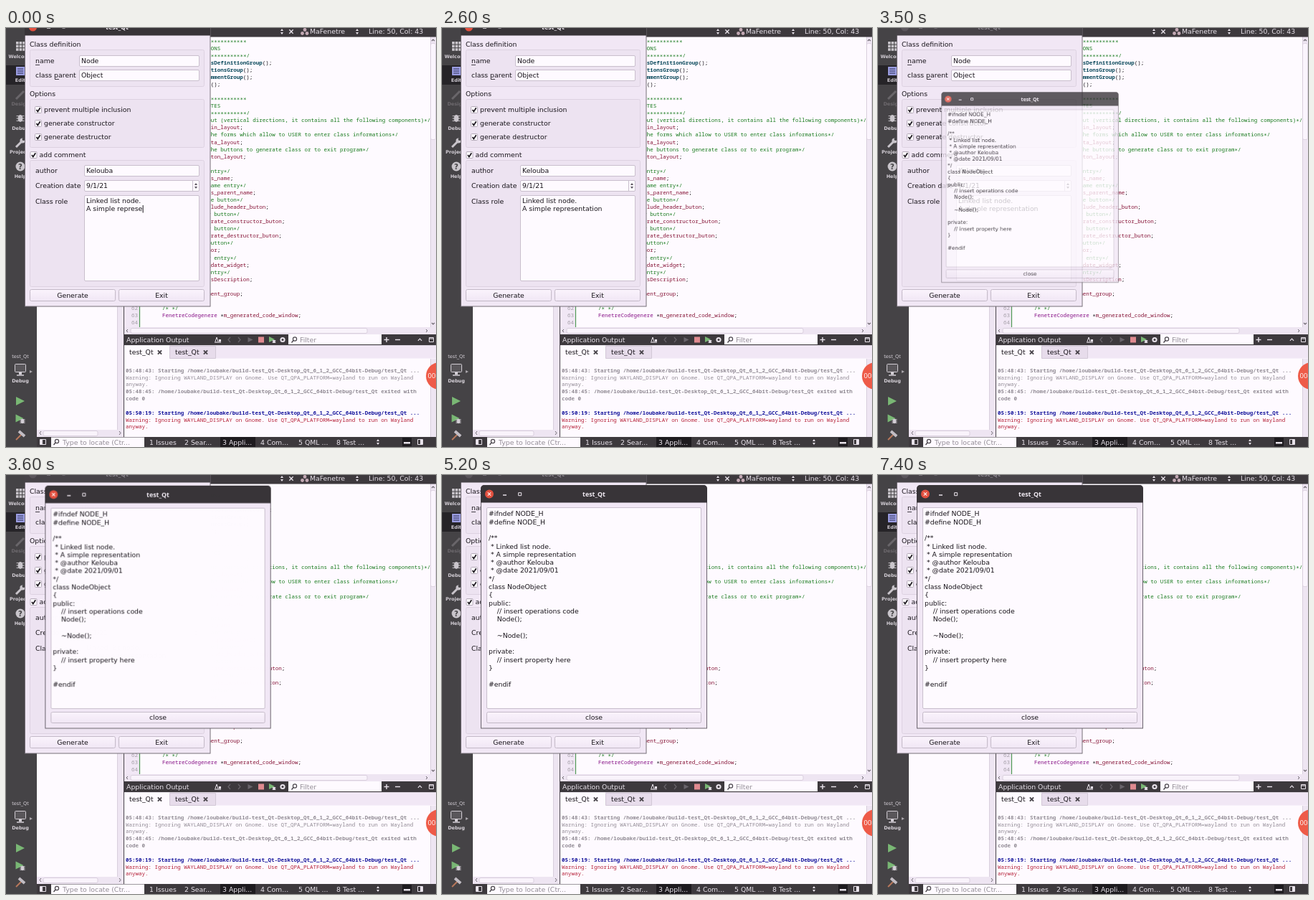
An HTML page with a canvas for the animation above (8000 ms loop, 600x584 px).

```html
<!DOCTYPE html>
<html>
<head>
<meta charset="utf-8">
<style>
html, body { margin: 0; width: 600px; height: 584px; overflow: hidden; }
canvas { display: block; }
</style>
</head>
<body>
<canvas id="stage" width="600" height="584"></canvas>
<script>
const UI = '9.33px "DejaVu Sans", sans-serif';
const SMALL = '6.5px "DejaVu Sans", sans-serif';
const SMALL_BOLD = 'bold 6.5px "DejaVu Sans", sans-serif';
const TITLE = 'bold 8.9px "Open Sans", sans-serif';
const MONO = '7.53px "Noto Sans Mono", "DejaVu Sans Mono", monospace';
const MONO_BOLD = 'bold ' + MONO;
const INK = '#19151b', PAPER = '#fefaff', PANEL = '#f1e7f5', EDGE = '#c9bfcd', BAR = '#3d393d', LIGHT = '#e8e2ea';
const GREEN = '#177a1c', FIELD = '#841234', PURPLE = '#850f85', GREY = '#928c95';

const screen = document.getElementById('stage').getContext('2d');
let g = screen;

function rect(x, y, w, h, fill, stroke, radius = 0) {
  g.beginPath();
  g.roundRect(x, y, w, h, radius);
  if (fill) { g.fillStyle = fill; g.fill(); }
  if (stroke) { g.strokeStyle = stroke; g.lineWidth = 1; g.stroke(); }
}
function circle(x, y, r, fill) {
  g.beginPath();
  g.arc(x, y, r, 0, 7);
  g.fillStyle = fill;
  g.fill();
}
function path(points, color, width) {
  g.beginPath();
  for (let i = 0; i < points.length; i += 2) g.lineTo(points[i], points[i + 1]);
  if (width) { g.strokeStyle = color; g.lineWidth = width; g.stroke(); }
  else { g.fillStyle = color; g.fill(); }
}
// y is the middle of the capitals
function text(str, x, y, color = INK, font = UI, align = 'left') {
  g.font = font;
  g.fillStyle = color;
  g.textAlign = align;
  g.fillText(str, x, y + parseFloat(font.match(/[\d.]+/)) * 0.36);
}
// code has its asterisks on the middle line
function code(str, x, y, color, font = MONO, align) {
  text(String(str).replaceAll('*', '\u2217'), x, y, color, font, align);
}
function cross(x, y, r, color, width) {
  path([x - r, y - r, x + r, y + r], color, width);
  path([x - r, y + r, x + r, y - r], color, width);
}
function chevron(x, y, s, color, up) {
  const d = up ? -s : s;
  path([x - s, y - d / 2, x, y + d / 2, x + s, y - d / 2], color, 1.2);
}
function updown(x, y, color = LIGHT) {
  path([x - 2, y - 1, x, y - 4, x + 2, y - 1], color);
  path([x - 2, y + 1, x, y + 4, x + 2, y + 1], color);
}
function play(x, y, r, color) {
  path([x - r, y - r, x + r, y, x - r, y + r], color);
}
function bug(x, y, s, color) {
  for (const d of [-s, 0, s]) path([x - 1.6 * s, y + d, x + 1.6 * s, y + d], color, 1);
  g.beginPath();
  g.ellipse(x, y, s, 1.5 * s, 0, 0, 7);
  g.fillStyle = color;
  g.fill();
}
function magnifier(x, y) {
  g.beginPath();
  g.arc(x, y, 2.6, 0, 7);
  g.strokeStyle = '#4b474d';
  g.lineWidth = 1.2;
  g.stroke();
  path([x - 2, y + 2, x - 4.5, y + 5], '#4b474d', 1.4);
}
function field(x, y, w, h, str) {
  rect(x + .5, y + .5, w - 1, h - 1, PAPER, EDGE, 1.5);
  if (str) text(str, x + 3, y + h / 2);
}
function button(x, y, w, h, label, active) {
  const shade = g.createLinearGradient(0, y, 0, y + h);
  shade.addColorStop(0, active ? '#e0dce8' : '#fbf4fd');
  shade.addColorStop(1, active ? '#cfcbda' : '#f0e6f4');
  rect(x + .5, y + .5, w - 1, h - 1, shade, active ? '#66809f' : '#c3b9c7', 2);
  text(label, x + w / 2, y + h / 2 - .3, INK, UI, 'center');
}
function check(x, y, label) {
  rect(x - 4.5, y - 4.5, 9, 9, PAPER, '#b5abb9', 1);
  path([x - 2.5, y, x - .7, y + 2.4, x + 2.7, y - 2.8], INK, 1.7);
  text(label, x + 8, y);
}
function layer(draw) {
  const canvas = document.createElement('canvas');
  canvas.width = 600;
  canvas.height = 584;
  g = canvas.getContext('2d');
  draw();
  g = screen;
  return canvas;
}

function drawSidebar() {
  rect(0, 0, 43, 584, '#454346');
  rect(0, 52, 43, 27, '#262428');
  for (let i = 0; i < 9; i++) rect(14 + i % 3 * 4.6, 19 + (i / 3 | 0) * 4.6, 3.6, 3.6, '#c9c5cb');
  rect(14, 54, 12, 12, '#9a9ce0');
  for (const y of [57, 60, 63]) path([16, y, 24, y], '#33345c', 1);
  path([14, 99, 25, 88], '#69666a', 3);
  bug(20, 126, 3.4, '#c9c5cb');
  path([14, 166, 21, 159], '#c9c5cb', 3);
  circle(23, 157, 3.6, '#c9c5cb');
  circle(24.5, 155, 2, '#454346');
  circle(20, 193, 6.5, '#c9c5cb');
  text('?', 20, 193, '#454346', 'bold 10px "DejaVu Sans", sans-serif', 'center');
  [['Welcome', 40], ['Edit', 73], ['Design', 106, '#6d696e'], ['Debug', 140], ['Projects', 173], ['Help', 207]]
    .forEach(([label, y, color = '#d3ced5']) => text(label, 20, y, color, SMALL_BOLD, 'center'));
  text('test_Qt', 20, 458, '#d8d3da', SMALL, 'center');
  rect(12.5, 468.5, 15, 11, '#59565a', '#d3ced5', 1);
  path([20, 480, 20, 483], '#d3ced5', 4);
  path([15, 484, 25, 484], '#d3ced5', 1.5);
  play(35, 479, 2, '#aaa6ac');
  text('Debug', 20, 492, '#d8d3da', SMALL_BOLD, 'center');
  play(20, 520, 6, '#79b774');
  play(19, 544, 5.5, '#79b774');
  bug(23, 548, 2.2, '#d3ced5');
  path([14, 574, 23, 565], '#b9785c', 2);
  path([18, 562, 26, 569], '#c2bdc4', 4);
}

// each line's visible end and the column where it stops
const CODE = [
  ['***********', 26], ['IONS', 18], ['*************/', 27],
  ['assDefinitionGroup();', 34], ['tionsGroup();', 28], ['mmentGroup();', 28], ['ns();', 18], [],
  ['************', 26], ['UTES', 18], ['*************/', 27],
  ['yout (vertical directions, it contains all the following components)*/', 83], ['ain_layout;', 25],
  [' the forms which allow to USER to enter class informations*/', 73], ['data_layout;', 25],
  [' the buttons to generate class or to exit program*/', 64], ['uton_layout;', 26], [],
  ['entry*/', 21], ['lass_name;', 22], [' name entry*/', 26], ['lass_parent_name;', 29],
  ['mple button*/', 25], ['clude_header_buton;', 33], ['tor button*/', 24], ['nerate_constructor_buton;', 38],
  ['tor button*/', 24], ['nerate_destructor_buton;', 37], [' button*/', 22], ['thor;', 18],
  ['or entry*/', 23], ['_date_widget;', 27], ['entry*/', 21], ['assDescription;', 28], [],
  ['mment_group;', 25], [], ['/* */', 5]
];

function drawEditor() {
  rect(165, 12, 435, 415, PAPER);
  rect(165, 12, 21, 405, PANEL);
  path([186.5, 388, 186.5, 417], '#4f9a55', 1.2);
  CODE.forEach(([str = '', columns = 0], i) => {
    const y = 18 + 10.06 * i, line = str.padStart(columns);
    if (str.endsWith('();')) {
      code(line.slice(0, -3), 218, y, '#0b4a5c', MONO_BOLD);
      code('();'.padStart(columns), 218, y, INK);
    } else if (str.endsWith(';')) {
      code(line.slice(0, -1), 218, y, FIELD);
      code(';'.padStart(columns), 218, y, INK);
    } else code(line, 218, y, GREEN);
  });
  code('FenetreCodegenere', 218, 400, PURPLE);
  code('*'.padStart(19), 218, 400, INK);
  code(' '.repeat(19) + 'm_generated_code_window', 218, 400, FIELD);
  code(';'.padStart(43), 218, 400, INK);
  [62, 63, 64].forEach((n, i) => code(n, 184, 390 + 10 * i, '#a59fa8', MONO, 'right'));

  rect(592, 12, 8, 405, '#eee5f2');
  rect(592.5, 21.5, 7, 134, '#fbf5fd', '#ddd3e1', 2);
  path([592.5, 12, 592.5, 417], '#d9cfdd', 1);
  chevron(596, 17, 2, '#6b656e', true);
  chevron(596, 412, 2, '#6b656e');
  rect(165, 417, 435, 10, '#eee5f2');
  rect(174, 418.5, 330, 7, '#f9f3fb', '#d9cfdd', 2);
  path([170, 420, 168, 422, 170, 424], '#6b656e', 1);
  path([586, 420, 588, 422, 586, 424], '#6b656e', 1);

  rect(165, 0, 435, 12.5, BAR);
  updown(385, 5);
  cross(398, 5, 2.7, LIGHT, 1.3);
  for (const [x, y] of [[417, 2.5], [413.5, 7.5], [420, 7.5]]) circle(x, y, 2.4, '#c3a9b4');
  text('MaFenetre', 424, 5, LIGHT);
  updown(490, 5);
  text('Line: 50, Col: 43', 506, 5, LIGHT);
}

function drawNavigator() {
  rect(43, 380, 122, 190, PAPER);
  rect(155, 380, 9, 190, '#eee5f2');
  path([155.5, 380, 155.5, 560], '#d9cfdd', 1);
  rect(43, 560, 121, 10, '#eee5f2');
  rect(52, 561.5, 76, 7, '#f9f3fb', '#d9cfdd', 2);
  path([49, 562, 47, 564.5, 49, 567], '#6b656e', 1);
  path([158, 562, 160, 564.5, 158, 567], '#6b656e', 1);
  path([164.5, 380, 164.5, 570], '#4a464b', 1);
}

function drawOutput() {
  rect(165, 427, 435, 15.5, BAR);
  text('Application Output', 168, 434.5, LIGHT);
  path([292, 437, 294, 431, 296, 437], LIGHT, 1);
  path([291, 438, 300, 438], LIGHT, 1.2);
  rect(297, 434, 3, 3, LIGHT);
  path([313, 431, 310, 434.5, 313, 438], '#69646b', 1.2);
  path([324, 431, 327, 434.5, 324, 438], '#69646b', 1.2);
  play(341, 434.5, 3.5, '#69646b');
  rect(352, 430.5, 8, 8, '#e08a90');
  play(371, 434, 4, '#79b774');
  bug(374, 437, 1.4, LIGHT);
  circle(386, 434.5, 3.6, LIGHT);
  circle(386, 434.5, 1.5, BAR);
  rect(394, 427, 130, 14, PAPER);
  magnifier(403, 433.5);
  text('Filter', 410, 434.5, '#948e97');
  path([527.5, 434.5, 534.5, 434.5], LIGHT, 1.4);
  path([531, 431, 531, 438], LIGHT, 1.4);
  path([543, 434.5, 550, 434.5], LIGHT, 1.4);
  chevron(577.5, 434.5, 2.6, LIGHT, true);
  rect(590.5, 431.5, 6, 6, null, LIGHT);
  path([590, 433, 597, 433], LIGHT, 1);

  rect(165, 442.5, 435, 127.5, PAPER);
  rect(165, 442.5, 435, 18, PANEL);
  rect(165, 442.5, 63, 18.5, PAPER);
  rect(228.5, 443.5, 64, 17, '#e7dceb', '#d3c8d7');
  [172, 236].forEach(x => {
    text('test_Qt', x, 452);
    cross(x + 42.5, 452, 2.6, '#4a464c', 2);
  });

  const run = '/home/loubake/build-test_Qt-Desktop_Qt_6_1_2_GCC_64bit-Debug/test_Qt';
  const warning = 'Warning: Ignoring WAYLAND_DISPLAY on Gnome. Use QT_QPA_PLATFORM=wayland to run on Wayland';
  [
    [477, `05:48:43: Starting ${run} ...`, GREY, MONO_BOLD],
    [487, warning, GREY],
    [496.5, 'anyway.', GREY],
    [506.5, `05:48:45: ${run} exited with`, GREY, MONO_BOLD],
    [516, 'code 0', GREY, MONO_BOLD],
    [536, `05:50:19: Starting ${run} ...`, '#15159c', MONO_BOLD],
    [546, warning, '#b51f36'],
    [555.5, 'anyway.', '#b51f36']
  ].forEach(([y, str, color, font]) => code(str, 167, y, color, font));
  rect(592, 461, 8, 109, '#eee5f2');
  path([592.5, 461, 592.5, 570], '#d9cfdd', 1);
}

function drawStatus() {
  rect(43, 570, 557, 14, BAR);
  rect(47.5, 573.5, 8, 7, null, LIGHT);
  rect(48, 574, 3, 6, LIGHT);
  rect(63, 570.5, 130, 13.5, PAPER);
  magnifier(71, 576);
  text('Type to locate (Ctr...', 79, 577.3, '#948e97');
  rect(299, 570, 49, 14, '#1e1b1f');
  ['1 Issues', '2 Sear...', '3 Appli...', '4 Com...', '5 QML ...', '8 Test ...']
    .forEach((label, i) => text(label, [200, 249, 302, 355, 408, 461][i], 577.3, LIGHT));
  updown(519, 577);
  rect(553, 571, 13, 12, '#1e1b1f');
  rect(555, 577, 9, 2.5, LIGHT);
  rect(574.5, 573.5, 7, 7, null, LIGHT);
  rect(578, 574, 3, 6, LIGHT);
}

function drawDialog() {
  rect(26, -5, 259.5, 393.5, '#777078');
  rect(27, 0, 257.5, 387.5, PANEL);
  text('Class definition', 33, 23);
  text('Options', 33, 91.5);
  [[30, 51], [99, 67], [184, 176]].forEach(([y, h]) => rect(33.5, y + .5, 243, h, '#ede3f1', '#ddd2e1', 2));
  text('name', 41, 46);
  path([41, 51.5, 47, 51.5], INK, .8);
  text('class parent', 41, 66);
  path([68, 71.5, 74, 71.5], INK, .8);
  field(102, 38, 168, 16, 'Node');
  field(102, 58, 168, 16, 'Object');
  check(45, 114, 'prevent multiple inclusion');
  check(45, 133, 'generate constructor');
  check(45, 152, 'generate destructor');
  check(38.5, 177, 'add comment');
  text('author', 41, 199);
  text('Creation date', 41, 220);
  text('Class role', 41, 242);
  field(109, 191, 161, 16, 'Kelouba');
  field(109, 212, 161, 16, '9/1/21');
  path([260.5, 213, 260.5, 227], EDGE, 1);
  updown(265, 220, '#5a545d');
  field(109, 233, 161, 120);
  text('Linked list node.', 112, 241);
  button(157, 364, 120, 17, 'Exit');
}

const GENERATED = `#ifndef NODE_H
#define NODE_H

/**
 * Linked list node.
 * A simple representation
 * @author Kelouba
 * @date 2021/09/01
*/
class NodeObject
{
public:
    // insert operations code
    Node();

    ~Node();

private:
    // insert property here
}

#endif`;

function drawPopup() {
  rect(54, 14, 316, 339.5, '#6b646d', null, [5, 5, 0, 0]);
  rect(55, 37, 314, 315.5, PANEL);
  rect(54, 14, 316, 24.5, '#383438', null, [5, 5, 0, 0]);
  circle(66, 26.5, 6, '#e2503f');
  cross(66, 26.5, 2.2, '#fff0ee', 1.2);
  path([85, 28, 90, 28], '#efe9f1', 1.4);
  rect(106.7, 24.7, 4, 4, null, '#efe9f1');
  text('test_Qt', 212, 26.5, '#f2ecf4', TITLE, 'center');
  field(62, 45, 300, 281);
  GENERATED.split('\n').forEach((line, i) => text(line, 65, 54 + 11.3 * i));
  button(62, 330, 300, 16, 'close');
}

const desktop = layer(() => {
  drawEditor();
  drawNavigator();
  drawOutput();
  drawStatus();
  drawSidebar();
  circle(605, 485, 19, '#ee5b48');
  text('00', 588.5, 485, '#fff', '9.5px "Open Sans", sans-serif');
  drawDialog();
});
const popup = layer(drawPopup);

function drawTitlebar(active) {
  rect(26, 0, 259, 10.5, active ? '#383438' : '#474348');
  circle(37.5, -1, 5.5, active ? '#e2503f' : '#5b565c');
  const color = active ? '#f2ecf4' : '#8b858d';
  path([57, 0, 62, 0], color, 1.4);
  rect(78.5, -4, 4, 4, null, color);
  text('test_Qt', 155, -1.2, color, TITLE, 'center');
}

const SENTENCE = 'A simple representation';
const KEYS = [200, 400, 700, 800, 900, 1000, 1200];
const OPEN = 3500;

function render(t) {
  screen.drawImage(desktop, 0, 0);
  drawTitlebar(t < OPEN);
  button(33, 364, 120, 17, 'Generate', t >= 3300 && t < OPEN);

  const typed = SENTENCE.slice(0, 16 + KEYS.filter(k => t >= k).length);
  text(typed, 112, 252);
  const caret = t < 1400 || t >= 2000 && t < 2600 || t >= 3200 && t < 3300;
  if (caret) rect(112.3 + screen.measureText(typed).width, 247, 1, 10.5, INK);

  if (t >= OPEN) {
    // the window grows from just below its bottom centre, easing out exponentially
    const u = Math.min(1, (t - OPEN + 33) / 150);
    const p = u < 1 ? 1 - 2 ** (-10 * u) : 1;
    screen.save();
    screen.globalAlpha = p;
    screen.translate(212, 360);
    screen.scale(p, p);
    screen.drawImage(popup, -212, -360);
    screen.restore();
  }
}

function tick() {
  render(Math.floor(performance.now() % 8000 / 100) * 100);
  requestAnimationFrame(tick);
}
tick();
</script>
</body>
</html>
```
